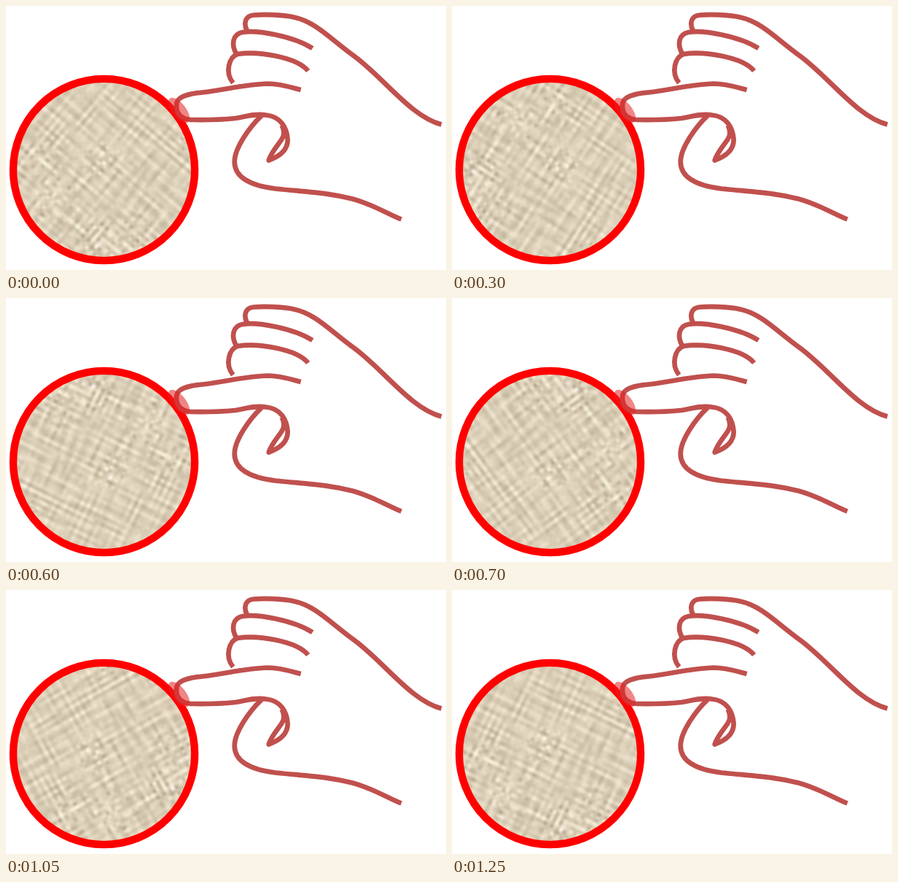
Recreate the animation shown at these times as an HTML page with a canvas. Size 604 by 362 pixels, loop 1.3 s.

```html
<!DOCTYPE html>
<html lang="en">
<head>
<meta charset="utf-8">
<title>Touching a turning fabric</title>
<style>
  html, body { margin: 0; width: 100%; height: 100%; overflow: hidden; background: #fff; }
  #stage { position: relative; width: 604px; height: 362px; overflow: hidden; }
  #cloth { position: absolute; left: 6.5px; top: 96.5px; width: 256px; height: 256px; border-radius: 50%; }
  svg { position: absolute; left: 0; top: 0; }
  .hand { fill: none; stroke: #c0504d; stroke-width: 6.7; stroke-linejoin: round; }
</style>
</head>
<body>
<div id="stage">
  <canvas id="cloth" width="256" height="256"></canvas>
  <svg width="604" height="362" viewBox="0 0 604 362">
    <circle cx="134.500" cy="224.500" r="124.6" fill="none" stroke="#f00" stroke-width="10.400"/>
    <g class="hand" transform="translate(-.3 -.5)">
      <path d="M331 34C326 24 329 14 340 13C352 12 380 12 396 16C425 22 446 46 478 69C520 100 556 152 598 163"/>
      <path d="M317 67C309 54 311 39 325 36.5C345 33 395 42 421 58.5"/>
      <path d="M312 106C300 91 307 70 318 66.500C345 62 399 70 415 89.500"/>
      <path d="M405 115.500C392 112 376 107 360 107C325 108 300 116 270 119C246 121 236 126 234.500 134C233 147 240 156 254 156.500C275 157 300 156 315 154.500C330 152 340 148 357 150C378 152 386 168 387 184C387 199 375 207 361 212C365 200 374 191 379 183C383 177 382 170 379 164"/>
      <path d="M351 151C335 166 314 195 314 214C314 237 338 247 370 251C420 256 445 257 476 265C505 273 525 286 543 293"/>
    </g>
    <ellipse cx="237.500" cy="143" rx="20.500" ry="9.500" transform="rotate(52 237.500 143)" fill="#e32222" fill-opacity=".55"/>
  </svg>
</div>
<script>
  const CELLS = 54, SIZE = 256, STEPS = 26, LOOP = 1300, START = -50;

  // Speckled areas of the weave: x, y from the centre, radius
  const patches = [
    [-84, 53, 32], [-49, 92, 28], [-66, -32, 25], [-97, -30, 16],
    [7, -14, 22], [98, 55, 14], [-43, -82, 25]
  ];

  const hash = (x, y, seed) => {
    const v = Math.sin(x * 127.1 + y * 311.7 + seed * 74.7) * 43758.5453;
    return (v - Math.floor(v)) * 2 - 1;
  };

  // A thread keeps its shade for a while along its length
  const thread = (n, along, seed) => {
    const t = along / 9 + hash(n, 0, seed + 5) * 3;
    const k = Math.floor(t), f = t - k, s = f * f * (3 - 2 * f);
    return hash(n, k, seed) * (1 - s) + hash(n, k + 1, seed) * s;
  };

  // Contrast of a thread against its two neighbours
  const ridge = (n, along, seed) => thread(n, along, seed)
    - 0.4 * (thread(n - 1, along, seed) + thread(n + 1, along, seed));

  const speckle = (x, y) => patches.reduce((sum, [px, py, r]) =>
    Math.max(sum, Math.exp(-((x - px) ** 2 + (y - py) ** 2) / (r * r))), 0);

  function weave() {
    const tile = document.createElement('canvas');
    tile.width = tile.height = CELLS;
    const ctx = tile.getContext('2d');
    const img = ctx.createImageData(CELLS, CELLS);
    for (let j = 0; j < CELLS; j++) {
      for (let i = 0; i < CELLS; i++) {
        const x = (i + 0.5) / CELLS * SIZE - SIZE / 2;
        const y = (j + 0.5) / CELLS * SIZE - SIZE / 2;
        const lines = 17 * ridge(i, j, 1) + 15 * ridge(j, i, 2);
        const knot = ((i + j) % 2 ? 1 : -1) * (8 + 20 * hash(i, j, 3)) + 24 * hash(i, j, 4);
        const shade = lines + knot * (0.2 + 0.8 * speckle(x, y));
        const p = (j * CELLS + i) * 4;
        img.data[p] = 219 + shade * 0.95;
        img.data[p + 1] = 207 + shade;
        img.data[p + 2] = 184 + shade * 1.06;
        img.data[p + 3] = 255;
      }
    }
    ctx.putImageData(img, 0, 0);
    return tile;
  }

  const cloth = document.getElementById('cloth');
  const ctx = cloth.getContext('2d');
  ctx.imageSmoothingQuality = 'high';
  ctx.drawImage(weave(), 0, 0, SIZE, SIZE);

  cloth.animate(
    [{ transform: `rotate(${START}deg)` }, { transform: `rotate(${START + 360}deg)` }],
    { duration: LOOP, iterations: Infinity, easing: `steps(${STEPS}, end)` }
  );
</script>
</body>
</html>
```
